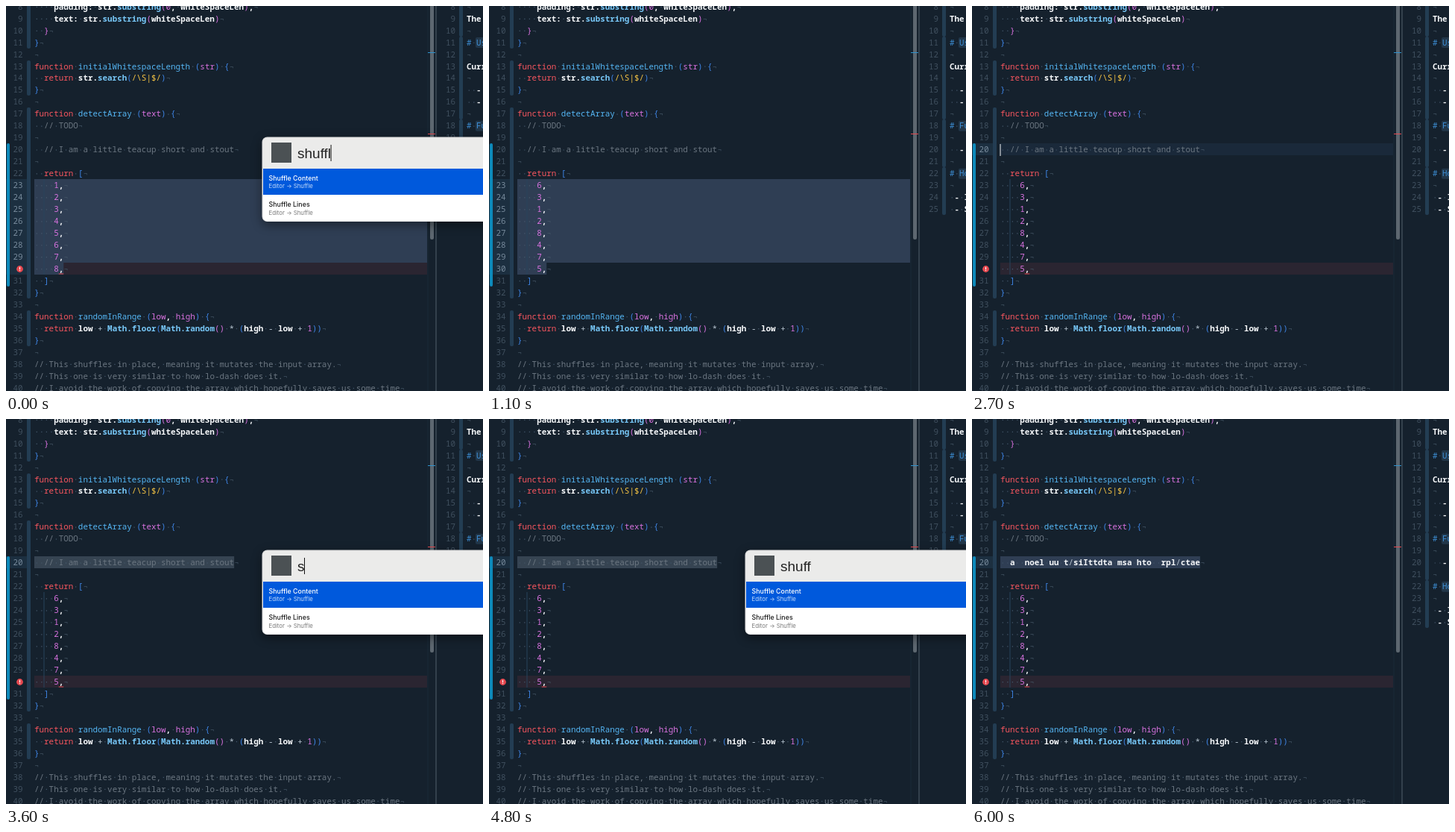
Recreate the animation shown at these times as an HTML page with a canvas. Size 640 by 516 pixels, loop 6.1 s.

```html
<!DOCTYPE html>
<html lang="en">
<head>
<meta charset="utf-8">
<title>Shuffle in the editor</title>
<style>
  html, body { margin: 0; width: 100%; height: 100%; overflow: hidden; background: #15212d; }
  canvas { display: block; }
</style>
</head>
<body>
<canvas id="stage" width="640" height="516"></canvas>
<script>
const ctx = document.getElementById('stage').getContext('2d');
const LOOP = 6100, ROW = 15.97, CHAR = 6.54;
const MONO = '500 10.9px "Noto Sans Mono", "DejaVu Sans Mono", monospace';
const BOLD = MONO.replace('500', '600');
const UI = 'Inter, Roboto, sans-serif';
const SELECTION = '#2f3e54';

// One-letter colour codes used in the code lines as ~x
const INK = {
  r: '#f8565f', b: '#55b6f4', k: '#78c8f8', p: '#3f86e8', m: '#d972e0', w: '#f6f8fa',
  y: '#f7c544', c: '#6b7681', o: '#b9c6d2', h: '#3d8fd6'
};
const HEAVY = 'wk';

const CODE = {
  8: '    ~wpadding: str.~ksubstring~m(0~w, whiteSpaceLen~m)~w,',
  9: '    ~wtext: str.~ksubstring~m(~wwhiteSpaceLen~m)',
  10: '  ~m}',
  11: '~p}',
  13: '~rfunction ~binitialWhitespaceLength ~p(~mstr~p) {',
  14: '  ~rreturn ~wstr.~ksearch~p(~y/\\S|$/~p)',
  15: '~p}',
  17: '~rfunction ~bdetectArray ~p(~mtext~p) {',
  18: '  ~c// TODO',
  20: '  ~c// I am a little teacup short and stout',
  22: '  ~rreturn ~p[',
  31: '  ~p]',
  32: '~p}',
  34: '~rfunction ~brandomInRange ~p(~mlow~w, ~mhigh~p) {',
  35: '  ~rreturn ~wlow ~o+ ~kMath.floor~p(~kMath.random~m() ~o* ~p(~whigh ~o- ~wlow ~o+ ~m1~p))',
  36: '~p}',
  38: '~c// This shuffles in place, meaning it mutates the input array.',
  39: '~c// This one is very similar to how lo-dash does it.',
  40: '~c// I avoid the work of copying the array which hopefully saves us some time'
};
const SCRAMBLED = '  ~wa  noel uu t~o/~wsiIttdta msa hto  rpl~o/~wctae';
const NOTES = {
  9: '~wThe ', 11: '~h# Us', 13: '~wCurr', 15: '  ~w- ', 16: '  ~w- ',
  18: '~h# Fu', 20: '  ~w- ', 22: '~h# Ho', 24: ' ~w- I', 25: ' ~w- S'
};
const COMMANDS = [
  ['Shuffle Content', 'Editor → Shuffle'],
  ['Shuffle Lines', 'Editor → Shuffle'],
  ['Show Issues Sidebar', 'View → Sidebars'],
  ['Show Publish Sidebar', 'View → Sidebars']
];

const rowY = n => 81 + (n - 13) * ROW;
const baseline = n => rowY(n) + 3.5;
const within = (t, from, to) => t >= from && t < to;

function rect(x, y, w, h, color, radius = 0) {
  ctx.fillStyle = color;
  ctx.beginPath();
  ctx.roundRect(x, y, w, h, radius);
  ctx.fill();
}

function label(str, x, y, color, font, align = 'left') {
  ctx.font = font;
  ctx.fillStyle = color;
  ctx.textAlign = align;
  ctx.fillText(str, x, y);
}

function rows(from, to, x, w, color, radius = 0) {
  const top = Math.floor(rowY(from) - 8);
  rect(x, top, w, Math.floor(rowY(to) + 8) - top, color, radius);
}

// Draws a marked-up line with visible spaces and a line-end sign
function codeLine(markup, x, n) {
  const y = baseline(n);
  let col = 0;
  (markup || '').split(/(?=~[a-z])/).forEach(part => {
    const coded = part[0] === '~';
    const str = coded ? part.slice(2) : part;
    const ink = coded ? part[1] : 'w';
    for (const word of str.split(/( )/)) {
      if (word === ' ') rect(x + col * CHAR + 2.7, y - 3.9, 1.2, 1.2, '#465a6e');
      else if (word) label(word, x + col * CHAR, y, INK[ink], HEAVY.includes(ink) ? BOLD : MONO);
      col += word.length;
    }
  });
  label('¬', x + col * CHAR + .5, y, '#465868', MONO.replace('10.9', '9'));
}

function errorBadge(y) {
  ctx.fillStyle = '#e5484f';
  ctx.beginPath();
  ctx.arc(18.5, y, 4.4, 0, Math.PI * 2);
  ctx.fill();
  rect(17.9, y - 2.7, 1.2, 3.3, '#fff');
  rect(17.9, y + 1.3, 1.2, 1.2, '#fff');
}

function stateAt(t) {
  const palette = t < 600 || within(t, 3300, 5200);
  const typed = t < 600 ? 'shuffl' : 'shuff'.slice(0, Math.max(0, Math.floor((t - 3500) / 100)));
  return {
    palette, typed,
    choices: within(t, 3700, 4000) ? 4 : 2,
    inputCaret: t < 500 || within(t, 3300, 4500) || within(t, 5000, 5200),
    numbers: t < 600 ? '12345678' : '63128475',
    listSelected: t < 2200,
    onComment: t >= 2200,
    commentSelected: t >= 2900,
    editCaret: within(t, 2200, 2900),
    scrambled: t >= 5200,
    error: t < 600 || t >= 1700
  };
}

function drawEditor(s) {
  rect(0, 0, 640, 516, '#15212d');
  rect(565.5, 0, 1, 516, '#1b2a38');
  rect(576, 0, 2, 516, '#33404c');

  if (s.error) rows(30, 30, 38, 527, '#2a2531');
  if (s.listSelected) {
    rows(23, 29, 38, 527, SELECTION);
    rows(30, 30, 38, 6 * CHAR, SELECTION);
  }
  if (s.commentSelected) rows(20, 20, 38, 41 * CHAR, s.palette ? '#364452' : SELECTION);
  else if (s.onComment) rows(20, 20, 38, 527, '#1a293a');
  rows(23, 30, 50.5, 1, '#29445c');

  const [first, last] = s.onComment ? [20, 20] : [23, 30];
  rows(first, last, 0, 28, '#1c2f40');
  rows(20, 31, 1, 4, '#0d8abb', 2);
  for (const [from, to] of [[7, 11], [13, 15], [17, 32], [34, 36]]) rows(from, to, 28, 5, '#233d53', 2);

  for (let n = 8; n <= 40; n++) {
    const inList = n >= 23 && n <= 30;
    const bright = n >= first && n <= last;
    if (n === 30 && s.error) errorBadge(rowY(n));
    else label(n, 22.6, baseline(n), bright ? '#778a9b' : '#40505f', MONO, 'right');
    let line = CODE[n];
    if (inList) line = `    ~m${s.numbers[n - 23]}~w,`;
    if (n === 20 && s.scrambled) line = SCRAMBLED;
    codeLine(line, 38, n);
  }
  if (s.error) rect(38 + 5 * CHAR, rowY(30) + 6, CHAR, 1, '#e5484f');
  if (s.editCaret) rect(37.5, 185, 1, 16, '#f2f5f8');

  rect(569, -10, 5, 323, '#5d6770', 2.5);
  rect(566, 62, 10, 1, '#2f93cf');
  rect(566, 171, 10, 1, '#e5484f');
}

function drawNotes() {
  for (const [from, to] of [[7, 10], [11, 17], [18, 21], [22, 25]]) rows(from, to, 608, 5, '#233d53', 2);
  for (const n of [11, 18, 22]) rect(630, rowY(n) - 7, 12, 14, '#22374a', 2);
  for (let n = 8; n <= 25; n++) {
    label(n, 603, baseline(n), '#40505f', MONO, 'right');
    codeLine(NOTES[n], 618, n);
  }
}

function drawPalette(s) {
  const height = 42 + s.choices * 35.5;
  ctx.save();
  ctx.shadowColor = 'rgba(0,0,0,.45)';
  ctx.shadowBlur = 14;
  ctx.shadowOffsetY = 4;
  rect(343.5, 175.5, 320, height + .5, '#d5d6d7', 7);
  ctx.restore();

  ctx.save();
  ctx.beginPath();
  ctx.roundRect(344.5, 176.5, 320, height - 1, 6);
  ctx.clip();
  rect(344, 176, 296, 42, '#ebebea');
  rect(344, 218, 296, height, '#fff');
  rect(345, 218, 295, 35, '#0059dc');

  rect(356, 183, 27, 27, '#4b5154');
  const font = '19px "Liberation Sans", Arial, sans-serif';
  label(s.typed, 391, 204, '#232323', font);
  if (s.inputCaret) rect(391 + ctx.measureText(s.typed).width - .5, 186, 1, 22, '#111');

  COMMANDS.slice(0, s.choices).forEach(([title, path], i) => {
    const y = 218 + i * 35.5;
    if (i > 1) rect(345, Math.round(y), 295, 1, '#e4e4e4');
    label(title, 352.5, y + 15.5, i ? '#1c1c1c' : '#fff', `500 8.9px ${UI}`);
    label(path, 352.5, y + 26, i ? '#7b7b7b' : '#c4daf9', `7.8px ${UI}`);
  });
  ctx.restore();
}

function draw(now) {
  const s = stateAt(Math.floor((now % LOOP) / 100) * 100);
  drawEditor(s);
  drawNotes();
  if (s.palette) drawPalette(s);
  requestAnimationFrame(draw);
}
requestAnimationFrame(draw);
</script>
</body>
</html>
```
